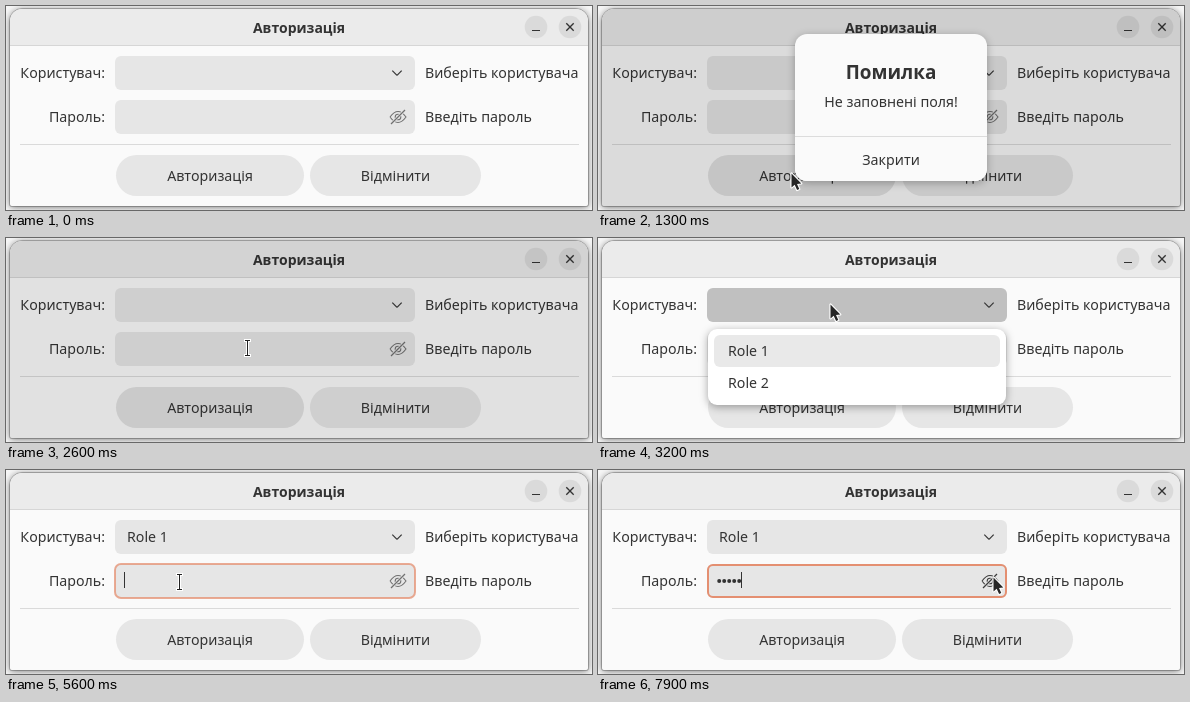
Write an HTML page with a canvas that moves like this. It is 586 px wide and 204 px high and loops after 8 s.

```html
<!DOCTYPE html>
<html lang="uk">
<head>
<meta charset="utf-8">
<title>Авторизація</title>
<style>
html, body { margin: 0; width: 100%; height: 100%; overflow: hidden; background: #fff; }
canvas { display: block; width: 586px; height: 204px; }
</style>
</head>
<body>
<canvas id="stage"></canvas>
<script>
const W = 586, H = 204, LOOP = 8000, STEP = 100;
const FONT = '"Noto Sans", "Open Sans", sans-serif';
const INK = '#333333', FIELD = 230;
const FIELD_X = 109, FIELD_W = 300, FIELD_H = 34, USER_Y = 50, PASS_Y = 94;
const MID = W / 2;
const canvas = document.getElementById('stage');
const ctx = canvas.getContext('2d');
const dpr = window.devicePixelRatio || 1;
canvas.width = W * dpr;
canvas.height = H * dpr;

const ramp = (t, a, b) => Math.min(1, Math.max(0, (t - a) / (b - a)));
const ease = k => k * k * (3 - 2 * k);
const pulse = (t, a, b, c, d) => ramp(t, a, b) * (1 - ramp(t, c, d));
const within = (t, a, b) => t >= a && t < b;
const lerp = (a, b, k) => a + (b - a) * k;
const gray = v => `rgb(${v},${v},${v})`;

// Each glide eases the pointer to its next stop
const ENTRY = { x: 290, y: 204 };
const GLIDES = [
  { from: 200, to: 600, x: 193, y: 167 },
  { from: 1800, to: 2300, x: 250, y: 153 },
  { from: 2400, to: 2800, x: 232, y: 66 },
  { from: 3600, to: 4300, x: 180, y: 118 },
  { from: 4300, to: 4700, x: 190, y: 171 },
  { from: 5100, to: 5500, x: 173, y: 112 },
  { from: 7200, to: 7900, x: 395, y: 107 }
];

function pointerAt(t) {
  let { x, y } = ENTRY;
  for (const g of GLIDES) {
    const k = ease(ramp(t, g.from, g.to));
    x = lerp(x, g.x, k);
    y = lerp(y, g.y, k);
  }
  return [Math.round(x), Math.round(y)];
}

function path(x, y, w, h, r) {
  ctx.beginPath();
  ctx.roundRect(x, y, w, h, r);
}

function box(x, y, w, h, r, fill) {
  path(x, y, w, h, r);
  ctx.fillStyle = fill;
  ctx.fill();
}

function outline(x, y, w, h, r, color, width) {
  path(x, y, w, h, r);
  ctx.strokeStyle = color;
  ctx.lineWidth = width;
  ctx.stroke();
}

function shadowBox(x, y, w, h, r, fill, alpha, blur, dy) {
  ctx.save();
  ctx.shadowColor = `rgba(0,0,0,${alpha})`;
  ctx.shadowBlur = blur * dpr;
  ctx.shadowOffsetY = dy * dpr;
  box(x, y, w, h, r, fill);
  ctx.restore();
}

function text(str, x, y, align = 'left', size = 14.2, weight = 400) {
  ctx.font = `${weight} ${size}px ${FONT}`;
  ctx.textAlign = align;
  ctx.fillStyle = INK;
  ctx.fillText(str, x, y);
}

function line(x0, y0, x1, y1, color, width) {
  ctx.beginPath();
  ctx.moveTo(x0, y0);
  ctx.lineTo(x1, y1);
  ctx.strokeStyle = color;
  ctx.lineWidth = width;
  ctx.stroke();
}

function dot(x, y, r, fill) {
  ctx.beginPath();
  ctx.arc(x, y, r, 0, Math.PI * 2);
  ctx.fillStyle = fill;
  ctx.fill();
}

function drawEye(x, y, color, fill) {
  ctx.strokeStyle = color;
  ctx.lineWidth = 1.1;
  ctx.beginPath();
  ctx.moveTo(x - 8, y);
  ctx.quadraticCurveTo(x, y - 11, x + 8, y);
  ctx.quadraticCurveTo(x, y + 11, x - 8, y);
  ctx.stroke();
  ctx.beginPath();
  ctx.arc(x, y, 2.8, 0, Math.PI * 2);
  ctx.stroke();
  line(x - 7, y + 7, x + 7, y - 7, fill, 2.6);
  line(x - 7, y + 7, x + 7, y - 7, color, 1.2);
}

function drawChevron(x, y, size) {
  for (const side of [-1, 1]) line(x + side * size, y - size / 2, x, y + size / 2, INK, 1.2);
}

const WINDOW = [4, 3, 578, 197, [12, 12, 2, 2]];

function drawWindow() {
  shadowBox(...WINDOW, gray(250), 0.55, 7, 1);
  outline(3.5, 2.5, 579, 198, [12.5, 12.5, 2, 2], 'rgba(0,0,0,.22)', 1);
  box(4, 3, 578, 36, [12, 12, 0, 0], gray(235));
  box(4, 39, 578, 1, 0, gray(214));
  text('Авторизація', MID, 27, 'center', 14, 700);
  const minX = 530, closeX = 564, y = 21;
  for (const x of [minX, closeX]) dot(x, y, 11.3, gray(218));
  line(minX - 4, y + 3.5, minX + 4, y + 3.5, INK, 1);
  for (const s of [-1, 1]) line(closeX - 3.7, y - 3.7 * s, closeX + 3.7, y + 3.7 * s, INK, 1.3);
}

function drawRow(label, hint, y, shade) {
  text(label, 99, y + 22, 'right');
  box(FIELD_X, y, FIELD_W, FIELD_H, 6, gray(shade));
  text(hint, 419, y + 22);
}

const listShown = t => pulse(t, 2900, 3100, 4300, 4500);

function drawUserRow(t) {
  drawRow('Користувач:', 'Виберіть користувача', USER_Y, lerp(FIELD, 192, listShown(t)));
  if (t >= 4400) text('Role 1', FIELD_X + 12, USER_Y + 22);
  drawChevron(391, USER_Y + 17, 4.7);
}

function drawPasswordRow(t) {
  drawRow('Пароль:', 'Введіть пароль', PASS_Y, FIELD);
  const focus = ramp(t, 5300, 5700);
  if (focus) {
    const inset = 1 - 4 * (1 - focus); // the ring closes in on the field
    outline(FIELD_X + inset, PASS_Y + inset, FIELD_W - 2 * inset, FIELD_H - 2 * inset,
      6 - inset, `rgba(228,143,113,${focus})`, 2);
  }
  const typed = Math.min(5, Math.max(0, Math.floor((t - 6100) / 250) + 1));
  const x = FIELD_X + 9, y = PASS_Y + 17;
  for (let i = 0; i < typed; i++) dot(x + 3.2 + i * 5, y, 2, INK);
  if (t >= 5400) box(x + typed * 5, y - 9, 1, 16, 0, INK);
  drawEye(392, y, gray(t >= 7800 ? 60 : 112), gray(FIELD));
}

function drawButtons(t) {
  const hover = pulse(t, 900, 1000, 2600, 2800);
  const y = 149, h = 41;
  box(14, 138, 559, 1, 0, gray(218));
  box(110, y, 188, h, h / 2, gray(FIELD - 5 * hover));
  box(304, y, 171, h, h / 2, gray(FIELD));
  text('Авторизація', 204, y + 26, 'center');
  text('Відмінити', 389.5, y + 26, 'center');
}

function drawPopover(t) {
  const x = 110, y = 91, rowH = 32;
  ctx.save();
  ctx.globalAlpha = listShown(t);
  shadowBox(x, y, 298, 76, 9, '#ffffff', 0.35, 8, 2);
  box(x + 6, y + 6, 286, rowH, 6, gray(233));
  for (const i of [1, 2]) text(`Role ${i}`, x + 20, y - 5 + i * rowH);
  ctx.restore();
}

function drawDialog(t) {
  const show = pulse(t, 1050, 1300, 2400, 2600);
  const w = 192, h = 147, x = MID - w / 2, y = 28, footY = 131;
  const scale = lerp(0.88, 1, show);
  ctx.save();
  ctx.globalAlpha = show;
  ctx.translate(MID, y + h / 2);
  ctx.scale(scale, scale);
  ctx.translate(-MID, -y - h / 2);
  shadowBox(x, y, w, h, 12, gray(250), 0.28, 9, 2);
  box(x, footY, w, y + h - footY, [0, 0, 12, 12], gray(lerp(250, 225, ramp(t, 1950, 2150))));
  box(x, footY - 1, w, 1, 0, gray(220));
  text('Помилка', MID, 73, 'center', 18.9, 700);
  text('Не заповнені поля!', MID, 101, 'center');
  text('Закрити', MID, 159, 'center');
  ctx.restore();
}

function drawArrow(x, y) {
  ctx.save();
  ctx.translate(x + 0.5, y + 0.5);
  const arrow = new Path2D('M0 0V14L3.2 11.2L5.6 16.6L7.8 15.6L5.5 10.4L9.8 10Z');
  ctx.lineJoin = 'round';
  ctx.strokeStyle = '#ffffff';
  ctx.lineWidth = 2.2;
  ctx.stroke(arrow);
  ctx.fillStyle = '#262626';
  ctx.fill(arrow);
  ctx.restore();
}

function drawBeam(x, y) {
  for (const [color, pad] of [['#ffffff', 1], ['#222222', 0]]) {
    const bar = (dx, dy, w, h) =>
      box(x + dx - pad, y + dy - pad, w + 2 * pad, h + 2 * pad, 0, color);
    bar(0, -7, 1, 14);
    for (const dy of [-8, 7]) bar(-2, dy, 5, 1);
  }
}

function drawPointer(t) {
  if (t < 300 || within(t, 6200, 7300)) return; // hidden while typing
  const [x, y] = pointerAt(t);
  const inField = x < 383 && within(y, PASS_Y, PASS_Y + FIELD_H);
  const beam = inField && !listShown(t);
  (beam ? drawBeam : drawArrow)(x, y);
}

function draw(t) {
  ctx.setTransform(dpr, 0, 0, dpr, 0, 0);
  ctx.fillStyle = gray(246);
  ctx.fillRect(0, 0, W, H);
  drawWindow();
  drawUserRow(t);
  drawPasswordRow(t);
  drawButtons(t);
  const dim = 0.31 * pulse(t, 1100, 1600, 2400, 2700);
  box(...WINDOW, `rgba(0,0,0,${dim})`);
  drawPopover(t);
  drawDialog(t);
  drawPointer(t);
}

const start = performance.now();
function tick() {
  const t = (performance.now() - start) % LOOP;
  draw(Math.floor(t / STEP) * STEP); // the screen updates ten times a second
  requestAnimationFrame(tick);
}
tick();
</script>
</body>
</html>
```
